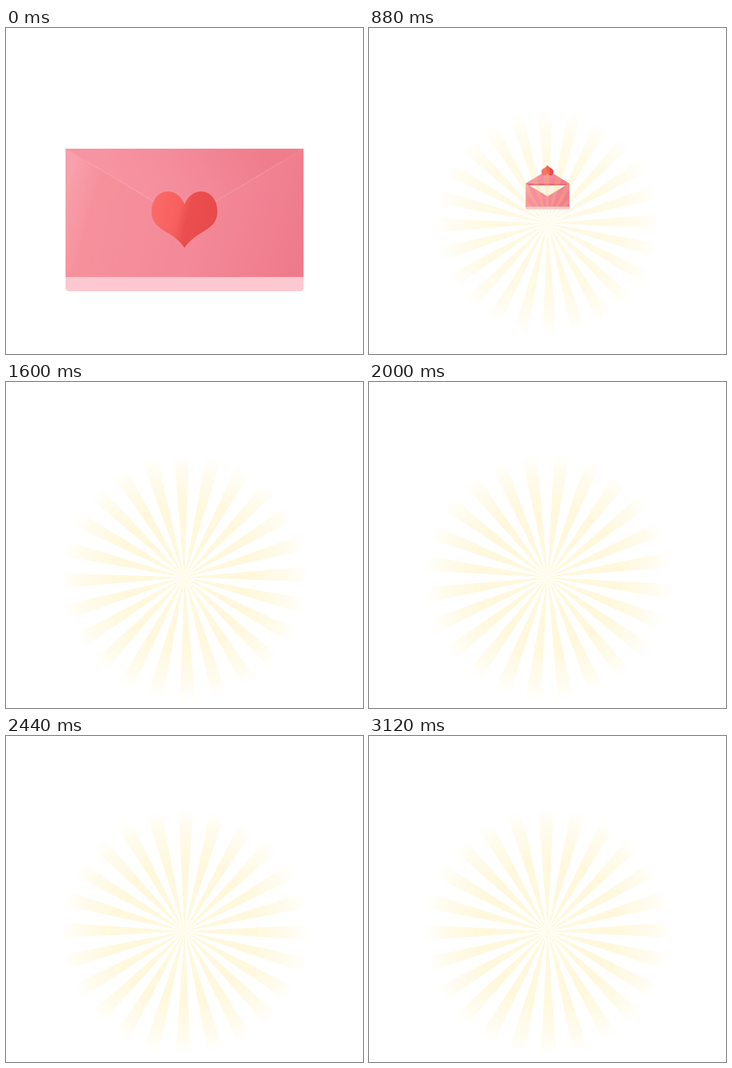
Recreate the animation shown at these times as an HTML page. Size 750 by 686 pixels, loop 3160 ms.

```html
<!DOCTYPE html>
<html lang="en">
<head>
<meta charset="utf-8">
<title>Love letter</title>
<style>
html, body { margin: 0; width: 100%; height: 100%; overflow: hidden; background: #fff; }
#stage { position: relative; width: 750px; height: 686px; overflow: hidden; }
#envelope { position: absolute; inset: 0; transform-origin: 375px 343px; }
#envelope svg { position: absolute; left: 125px; top: 254px; width: 500px; height: 300px; overflow: visible; }
#back { z-index: 0; }
#front { z-index: 2; }
#flap { transform-origin: 50% 0; }
#rays {
  --fade: radial-gradient(closest-side, rgb(0 0 0 / .23), rgb(0 0 0 / .22) 55%, rgb(0 0 0 / .1) 82%, transparent 95%);
  position: absolute; left: 100px; top: 136px; width: 550px; height: 550px;
  background: repeating-conic-gradient(from -3.5deg, #ffe066 0 6.85deg, #ffe06600 7.1deg 14.75deg, #ffe066 15deg);
  -webkit-mask-image: var(--fade);
  mask-image: var(--fade);
}
</style>
</head>
<body>
<div id="stage">
  <div id="envelope">
    <svg id="back" viewBox="0 0 500 300">
      <rect width="500" height="290" fill="#e46a79"/>
    </svg>
    <svg id="flap" viewBox="0 0 500 300">
      <defs>
        <linearGradient id="flapFill" gradientUnits="userSpaceOnUse" x1="140" y1="130" x2="400" y2="-10">
          <stop offset="0" stop-color="#f794a2"/>
          <stop offset=".45" stop-color="#f48b9a"/>
          <stop offset="1" stop-color="#ef7d8d"/>
        </linearGradient>
        <linearGradient id="heartFill" gradientUnits="userSpaceOnUse" x1="185" y1="120" x2="315" y2="150">
          <stop offset="0" stop-color="#fb6a67"/>
          <stop offset=".4" stop-color="#f75f5e"/>
          <stop offset=".56" stop-color="#eb4e4e"/>
          <stop offset="1" stop-color="#e84a4b"/>
        </linearGradient>
      </defs>
      <path d="M0 0H500L250 150Z" fill="url(#flapFill)"/>
      <path d="M0 0L250 150L500 0" fill="none" stroke="#ffc4cc" stroke-opacity=".3"/>
      <path fill="url(#heartFill)" d="M250 117C243 100 230 90 215 90C195 90 181 108 181 132C181 154 193 164 213 176C230 186 242 196 250 209C258 196 270 186 287 176C307 164 319 154 319 132C319 108 305 90 285 90C270 90 257 100 250 117Z"/>
    </svg>
    <svg id="front" viewBox="0 0 500 300">
      <defs>
        <linearGradient id="bodyFill" gradientUnits="userSpaceOnUse" x1="0" y1="90" x2="500" y2="230">
          <stop offset="0" stop-color="#f8a0ab"/>
          <stop offset=".12" stop-color="#f6919c"/>
          <stop offset=".55" stop-color="#f48998"/>
          <stop offset="1" stop-color="#ee7a8b"/>
        </linearGradient>
      </defs>
      <rect x="44" y="25" width="412" height="200" rx="5" fill="#fff5e4"/>
      <path d="M0 0L250 150L500 0V270H0Z" fill="url(#bodyFill)"/>
      <path d="M0 270H500V292Q500 300 492 300H8Q0 300 0 292Z" fill="#fdc8d1"/>
    </svg>
  </div>
  <div id="rays"></div>
</div>
<script>
const LOOP = 3160, STEP = 40;
const [envelope, flap, rays] = ['envelope', 'flap', 'rays'].map(id => document.getElementById(id).style);

function bezier(x1, y1, x2, y2) {
  const at = (a, b, u) => 3 * a * u * (1 - u) ** 2 + 3 * b * u * u * (1 - u) + u ** 3;
  return x => {
    if (x <= 0) return 0;
    if (x >= 1) return 1;
    let lo = 0, hi = 1;
    for (let i = 0; i < 24; i++) {
      const mid = (lo + hi) / 2;
      if (at(x1, x2, mid) < x) lo = mid; else hi = mid;
    }
    return at(y1, y2, lo);
  };
}
const ease = bezier(.25, .1, .25, 1);
const easeInOut = bezier(.42, 0, .58, 1);

function draw(t) {
  const angle = 180 * ease(t / 790);
  const swap = easeInOut((t - 134) / 1060);
  envelope.transform = `scale(${1 - swap})`;
  envelope.visibility = swap < 1 ? 'visible' : 'hidden';
  flap.transform = `perspective(900px) rotateX(${angle}deg)`;
  flap.zIndex = angle < 90 ? 3 : 1;   // an open flap lies behind the letter
  rays.opacity = swap;
  rays.transform = `rotate(${.0203 * (t - 880) - 1}deg) scale(${.5 + swap / 2})`;
}

const start = performance.now();
function tick() {
  const t = (performance.now() - start) % LOOP;
  draw(Math.floor(t / STEP) * STEP);
  requestAnimationFrame(tick);
}
tick();
</script>
</body>
</html>
```
